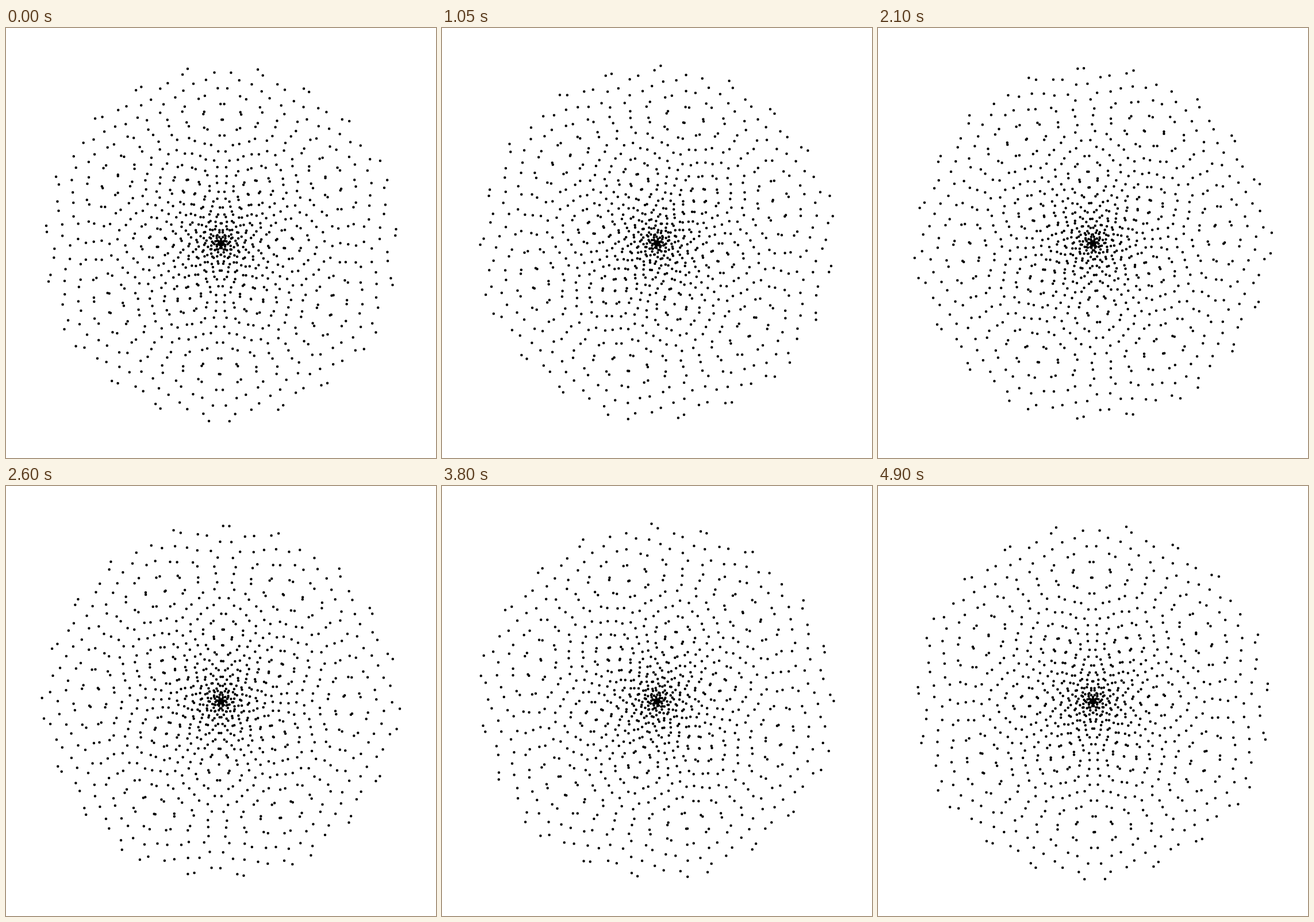
An HTML page with a canvas that plays this animation: 748x748 px, repeating every 4.95 s.

```html
<!DOCTYPE html>
<html lang="en">
<head>
<meta charset="utf-8">
<title>Dots on an Archimedean spiral</title>
<style>
  html, body { margin: 0; width: 100%; height: 100%; overflow: hidden; background: #fff; }
  canvas { display: block; }
</style>
</head>
<body>
<canvas id="stage" width="748" height="748"></canvas>
<script>
const ctx = document.getElementById("stage").getContext("2d");
const SIZE = 748, CENTER = SIZE / 2, SCALE = CENTER / 600;
const COUNT = 500, DOT = 2.25, STEP = 50, STEPS = 99;

// Dots sit one radian apart on r = u and slide along it by one radian per loop.
function draw(shift) {
  ctx.clearRect(0, 0, SIZE, SIZE);
  ctx.beginPath();
  for (let n = -COUNT; n < COUNT; n++) {
    const u = n + shift;
    const x = CENTER + SCALE * u * Math.cos(u);
    const y = CENTER + SCALE * u * Math.sin(u);
    ctx.moveTo(x + DOT, y);
    ctx.arc(x, y, DOT, 0, 2 * Math.PI);
  }
  ctx.fill();
}

const start = performance.now();
function tick() {
  const step = Math.floor((performance.now() - start) / STEP) % STEPS;
  draw((step + 1) / 100);
  requestAnimationFrame(tick);
}
tick();
</script>
</body>
</html>
```
